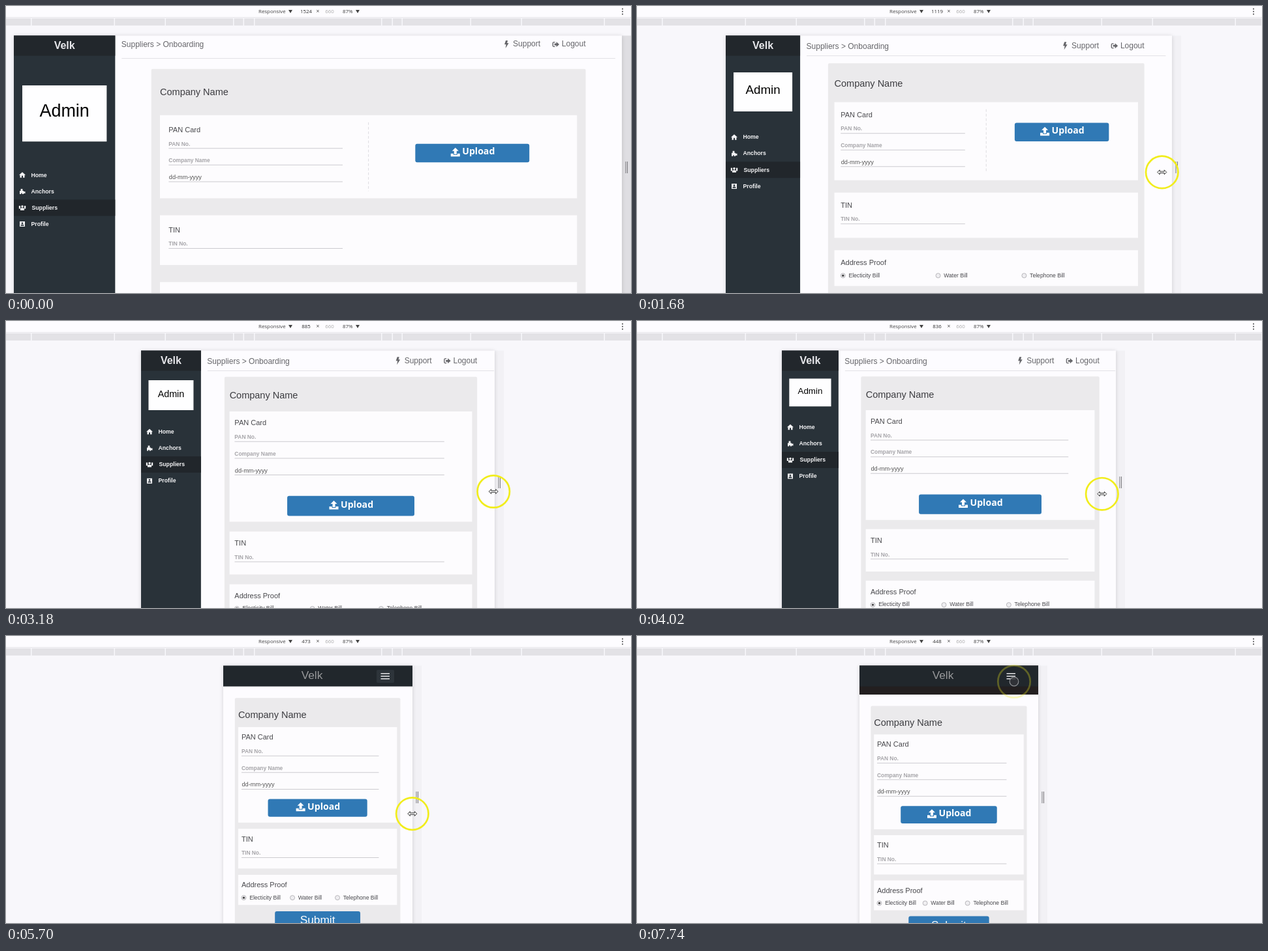
Write an HTML page with a canvas that moves like this. It is 958 px wide and 441 px high and loops after 7770 ms.

```html
<!DOCTYPE html>
<html lang="en">
<head>
<meta charset="utf-8">
<title>Responsive layout demo</title>
<style>
html, body { margin: 0; width: 100%; height: 100%; overflow: hidden; background: #f8f7fb; }
canvas { display: block; }
</style>
</head>
<body>
<canvas id="stage" width="958" height="441"></canvas>
<script>
const g = document.getElementById('stage').getContext('2d');
const LOOP = 7770, STEP = 60, TOP = 45.5, BOTTOM = 441, CENTER = 478, SCALE = .6115;
const WIDE_FROM = 590, WIDE_MIN = 672, TABLET_FROM = 470;
const SANS = '"Liberation Sans", Arial, sans-serif';
const OPEN = '"Open Sans", "Noto Sans", sans-serif';
const BRAND = 'Velk';

// Device width while the handle is dragged: [time, width]
const DRAG = [
  [780, 1524], [1080, 1358], [1620, 1132], [2340, 979], [2600, 979],
  [3180, 885], [4020, 836], [4800, 625], [5580, 478], [6300, 448]
];

const clamp = v => Math.max(0, Math.min(1, v));
const ramp = (t, from, to) => clamp((t - from) / (to - from));
const mix = (a, b, k) => a + (b - a) * k;

function deviceWidth(t) {
  const i = Math.max(1, DRAG.findIndex(([time]) => time >= t));
  if (t >= DRAG.at(-1)[0]) return DRAG.at(-1)[1];
  const [t0, w0] = DRAG[i - 1], [t1, w1] = DRAG[i];
  return mix(w0, w1, ramp(t, t0, t1));
}

function box(x, y, w, h, color, r = 0) {
  g.fillStyle = color;
  g.beginPath();
  g.roundRect(x, y, w, h, r);
  g.fill();
}
function text(s, x, y, size, color, { bold = '', align = 'left', font = SANS } = {}) {
  g.font = `${bold} ${size}px ${font}`;
  g.textAlign = align;
  g.textBaseline = 'middle';
  g.fillStyle = color;
  g.fillText(s, x, y);
}
function shape(d, x, y, color, outline) {
  const path = new Path2D(d);
  g.save();
  g.translate(x, y);
  g.fillStyle = color;
  g.fill(path, 'evenodd');
  if (outline) {
    g.strokeStyle = outline;
    g.lineWidth = 1;
    g.stroke(path);
  }
  g.restore();
}
function disc(x, y, r, fill, stroke, width) {
  g.beginPath();
  g.arc(x, y, r, 0, 7);
  if (fill) { g.fillStyle = fill; g.fill(); }
  if (stroke) { g.strokeStyle = stroke; g.lineWidth = width; g.stroke(); }
}

// Icons are drawn around their centre
const ICON = {
  bolt: 'M-1-6H2L1-2H3.5L-1.5 6L-.5 0H-3Z',
  logout: 'M-1-4H-3Q-5-4-5-2V2Q-5 4-3 4H-1V2.7H-3Q-3.6 2.7-3.6 2V-2Q-3.6-2.7-3-2.7H-1ZM-2-1.4H1V-4L5.5 0L1 4V1.4H-2Z',
  upload: 'M0-7L5-2H2V3H-2V-2H-5ZM-7 2H-3V4H3V2H7V6.5H-7Z',
  home: 'M0-4.5L5 0H3.5V4H1V1H-1V4H-3.5V0H-5Z',
  puzzle: 'M-4-1H-2.4V-4H.4V-1H2V0H4.5V3H2V4H-.2V2.5H-1.8V4H-4Z',
  users: 'M-1.8-2a1.8 1.8 0 1 0 3.6 0a1.8 1.8 0 1 0-3.6 0ZM-3 4V2Q-3 .5-1.5 .3H1.5Q3 .5 3 2V4ZM-5.2 1.6V-3H-3V1.6ZM3 1.6V-3H5.2V1.6Z',
  card: 'M-4-4H4V4H-4ZM-1.4-1.3a1.4 1.4 0 1 0 2.8 0a1.4 1.4 0 1 0-2.8 0ZM-2.5 2.7H2.5V1.5L1.2 .6H-1.2L-2.5 1.5Z',
  down: 'M-3-2.5H3L0 2.5Z',
  resize: 'M-7 0L-3.5-3.5V-1.2H3.5V-3.5L7 0L3.5 3.5V1.2H-3.5V3.5Z'
};

function toolbar(width) {
  const left = { font: OPEN }, mid = { font: OPEN, align: 'center' };
  box(0, 0, 958, 17, '#fdfcff');
  box(0, 17, 958, 1, '#e6e5e9');
  box(0, 19, 957, 11, '#e3e2e6');
  for (const x of [38, 165.5, 243.5, 348, 363.5, 380, 575, 591.5, 606.5, 711.5, 789.5, 916.5])
    box(x, 19, 1.5, 11, '#f8f7fb');
  text('Responsive', 387, 8.5, 7.9, '#444', left);
  shape(ICON.down, 436, 8.5, '#444');
  text(width, 460, 8.5, 7.9, '#333', mid);
  text('×', 478, 9, 8.5, '#444', mid);
  text('660', 496, 8.5, 7.9, '#aaa', mid);
  text('87%', 516, 8.5, 7.9, '#444', left);
  shape(ICON.down, 539, 8.5, '#444');
  for (const y of [4.5, 8.5, 12.5]) disc(945, y, 1, '#444');
}

function sidebar(x, s) {
  const mid = x + s / 2, w = .952 * s - 18.5, h = w * 2 / 3, top = 46 + .49 * s;
  box(x, TOP, s, BOTTOM - TOP, '#293239');
  box(x, TOP, s, 31, '#22272c');
  text(BRAND, mid, 61.5, 16, '#e8e8ec', { align: 'center', bold: 'bold' });
  box(mid - w / 2, top, w, h, '#fefeff');
  text('Admin', mid, top + h * .47, w * .208, '#000', { align: 'center' });
  const home = 40.8 + 1.41 * s;
  [['Home', 'home'], ['Anchors', 'puzzle'], ['Suppliers', 'users'], ['Profile', 'card']].forEach(([label, icon], i) => {
    const y = home + i * 25.1, on = i === 2;
    if (on) box(x, y - 12.5, s, 25, '#21262b');
    shape(ICON[icon], x + 13, y, '#f4f4f6');
    text(label, x + (on ? 27.5 : 26.5), y + .3, 8.7, '#f4f4f6', { bold: 'bold' });
  });
}

function header(x, end, right, rule, L) {
  const y = 62.3 - ramp(L, 672, 932) * 2.3, color = '#66666a';
  text('Suppliers > Onboarding', x + 9.5, y, 12, color);
  box(x + 10, rule, end - x - 20, 1, '#e3e2e6');
  shape(ICON.bolt, right - 121.5, y - 1, color);
  text('Support', right - 69.5, y - 1, 12, color, { align: 'right' });
  shape(ICON.logout, right - 46, y - 1, color);
  text('Logout', right, y - 1, 12, color, { align: 'right' });
}

function mobileBar(x, right, menu, t) {
  if (menu) box(x, TOP, right - x, 32 + menu, '#231f20');
  box(x, TOP, right - x, 32, '#21272c');
  if (t < 5600) box(right - 19, TOP, 19, 32, '#24211f');
  text(BRAND, 469, 61.5, 17.3, '#98999b', { align: 'center' });
  if (t < 6400) box(right - 55, 52, 27, 20, '#2d343a', 2);
  for (const y of [57, 61, 65]) box(right - 48.5, y, 13.5, 1.5, '#e6e6e8');
}

function field(label, x, y, w, date) {
  if (date) text(label, x + .5, y - 6.5, 9.2, '#555');
  else text(label, x, y - 6.5, 8.4, '#a6a5a9', { bold: 'bold' });
  box(x, y - .5, w, 1, '#cccbcf');
}

// Every distance grows with the card width
function form(x, top, cw, wide, tablet) {
  const white = '#fdfcfe', dark = '#48484c', blue = '#3079b5';
  const pad = .02 * cw, px = x + pad, tx = px + pad, pw = cw - 2 * pad;
  const gap = .04 * cw - .5, inset = 12 + .0165 * cw;
  const line = wide ? .42 * cw - 13 : .83 * cw;

  const p1 = top + 28.5 + .064 * cw, pan = p1 + inset;
  const up = pan + (wide ? .05 * cw - 12.3 : tablet ? 111.5 : 90.5 + .0147 * cw);
  const uh = wide ? 28.5 : 20.6 + .026 * cw;
  const b1 = wide ? pan + 88 + .025 * cw : up + uh + 9;
  const p2 = b1 + gap, tin = p2 + inset, b2 = tin + 39.5 + .021 * cw;
  const p3 = b2 + gap, proof = p3 + inset, b3 = p3 + 37 + .037 * cw;

  box(x, top, cw, 500, '#ebeaec', 2);
  text('Company Name', px, top + 20.5 + .024 * cw, 14.5, '#3c3c40');
  for (const [y, end] of [[p1, b1], [p2, b2], [p3, b3]]) box(px, y, pw, end - y, white);

  text('PAN Card', tx, pan, 11, dark);
  ['PAN No.', 'Company Name', 'dd-mm-yyyy'].forEach((label, i) =>
    field(label, tx, pan + 28 + i * 25.6, line, i === 2));
  if (wide) {
    g.setLineDash([4, 3]);
    g.strokeStyle = '#dddce0';
    g.lineWidth = 1;
    g.beginPath();
    g.moveTo(x + cw / 2, p1 + 11);
    g.lineTo(x + cw / 2, b1 - 11);
    g.stroke();
    g.setLineDash([]);
  }
  const mid = x + cw * (wide ? .739 : .5), bw = wide ? 63 + .168 * cw : 71 + .32 * cw;
  box(mid - bw / 2, up, bw, uh, blue, 3);
  shape(ICON.upload, mid - 26, up + uh / 2 - 1.2, '#fff');
  text('Upload', mid - 15.5, up + uh / 2 - 1.2, 14.1, '#fff', { bold: 'bold', font: OPEN });

  text('TIN', tx, tin, 11, dark);
  field('TIN No.', tx, tin + 28, line);

  text('Address Proof', tx, proof, 11, dark);
  [['Electicity Bill', 3.5], ['Water Bill', .308 * cw], ['Telephone Bill', .58 * cw]].forEach(([label, dx], i) => {
    const y = proof + 19;
    disc(tx + dx, y, 3.5, '#efeef1', '#a9a8ac', .8);
    if (!i) disc(tx + dx, y, 1.7, '#444');
    text(label, tx + dx + 8.7, y, 8.6, dark);
  });

  box(x + cw * .242, b3 + gap, cw * .516, 29, blue, 3);
  text('Submit', x + cw / 2, b3 + gap + 14.5, 17.3, '#fff', { align: 'center' });
}

// The pointer pulls ahead of the page edge, then goes to the menu button
function pointer(t) {
  const k = ramp(t, 6360, 6660), go = k * k * (3 - 2 * k);
  const edge = CENTER + deviceWidth(t + 300) * SCALE / 2 + 4;
  const x = mix(edge + 60 * (1 - ramp(t, 300, 600)), 578, go);
  const y = mix(248 + .0044 * t, 74 - 4 * ramp(t, 6660, 7740), go);
  g.globalAlpha = 1 - .7 * ramp(t, 7200, 7740);
  disc(x, y, 24.7, null, '#f1ed1c', 2.7);
  g.globalAlpha = 1;
  if (t > 6450) disc(x, y, 6.8, 'rgba(50,53,57,.85)', '#8d8f92', 1.2);
  else shape(ICON.resize, x, y, '#fff', '#333');
}

function draw(t) {
  const W = deviceWidth(t), V = W * SCALE;
  const x = Math.round(CENTER - V / 2), right = Math.round(CENTER + V / 2);
  const wide = V > WIDE_FROM, mobile = V <= TABLET_FROM;

  box(0, 0, 958, BOTTOM, '#f8f7fb');
  toolbar(Math.round(W));
  box(right, TOP, 14, BOTTOM - TOP, t < 780 ? '#dfdee2' : '#f2f1f5');
  g.shadowColor = 'rgba(0,0,0,.15)';
  g.shadowBlur = 6;
  box(x, TOP, right - x, 420, '#fdfcff');
  g.shadowColor = 'transparent';
  g.shadowBlur = 0;

  g.save();
  g.beginPath();
  g.rect(x, TOP - 1, right - x, 420);
  g.clip();
  if (mobile) {
    const margin = 10 + .027 * V, menu = 12.5 * ramp(t, 7560, 7740);
    form(x + margin, TOP + 32 + margin + menu, V - 2 * margin, false, false);
    mobileBar(x, right, menu, t);
    g.globalAlpha = ramp(t, 6300, 6420) * ramp(t, 7080, 6840);
    box(right - 3.5, 48, 1.7, 388, '#98989b', 1);
    g.globalAlpha = 1;
  } else {
    // The page may be laid out wider than its window and is then cut off
    const L = wide ? Math.max(V, WIDE_MIN) : V + 10;
    const s = L / 6, main = L - s, margin = 8 + .061 * main, cw = main - 2 * margin;
    const rule = 76 + 4 * ramp(L, 830, 932);
    header(x + s, x + L, x + s + margin + cw, rule, L);
    form(x + s + margin, rule + .025 * cw, cw, wide, true);
    sidebar(x, s);
  }
  g.restore();

  for (const dx of [5.5, 8]) box(right + dx, 239, 1, 18, '#77767a');
  pointer(t);
}

const start = performance.now();
function frame() {
  const t = (performance.now() - start) % LOOP;
  draw(Math.floor(t / STEP) * STEP);
  requestAnimationFrame(frame);
}
frame();
</script>
</body>
</html>
```
